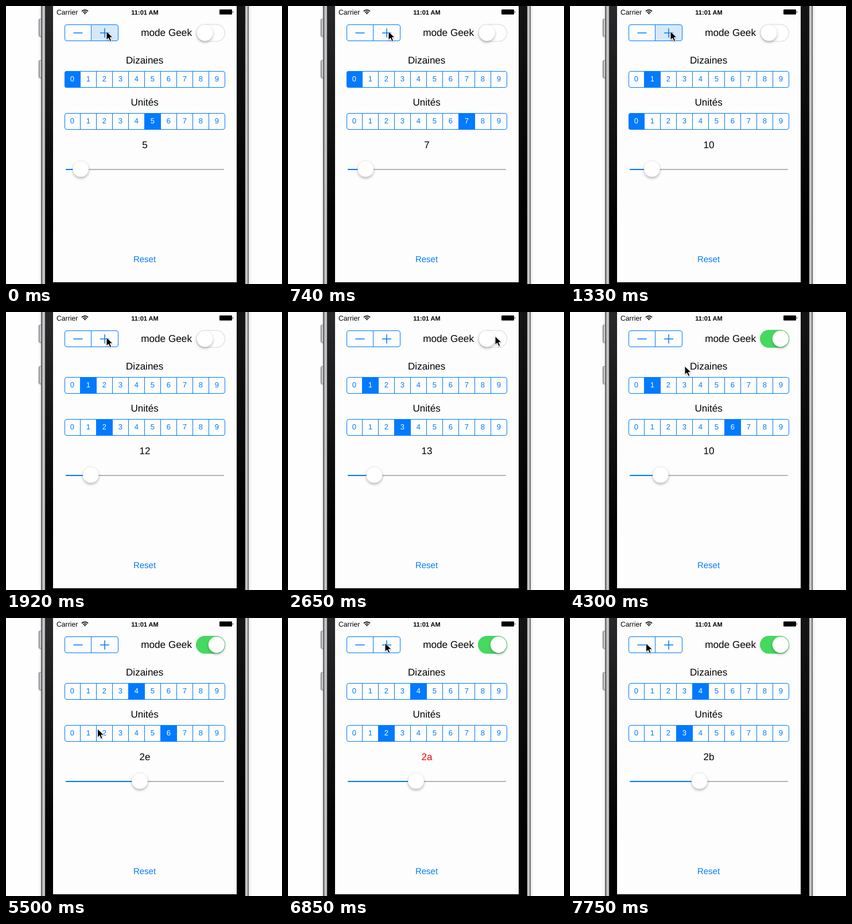
These frames come from a looping animation (481 by 483 pixels, 8000 ms). An HTML page:

```html
<!DOCTYPE html>
<html lang="fr">
<head>
<meta charset="utf-8">
<title>Compteur</title>
<style>
html, body { margin: 0; width: 100%; height: 100%; overflow: hidden; background: #fefefe; }
svg { display: block; width: 481px; height: 483px; }
text { font-family: "Liberation Sans", Arial, sans-serif; font-size: 17px; text-rendering: geometricPrecision; }
.mid { text-anchor: middle; }
.digit { font-size: 13px; text-anchor: middle; fill: #007aff; }
.line { fill: none; stroke: #007aff; }
</style>
</head>
<body>
<svg viewBox="0 0 481 483">
  <defs>
    <linearGradient id="edgeL">
      <stop offset="0" stop-color="#555557"/><stop offset=".2" stop-color="#77777a"/>
      <stop offset=".35" stop-color="#bdbdbf"/><stop offset=".8" stop-color="#cfcfd1"/>
      <stop offset="1" stop-color="#4a4a4c"/>
    </linearGradient>
    <linearGradient id="edgeR" href="#edgeL" x1="1" x2="0"/>
    <linearGradient id="key">
      <stop offset="0" stop-color="#8a8a8d"/><stop offset=".5" stop-color="#dededf"/><stop offset="1" stop-color="#a5a5a8"/>
    </linearGradient>
    <linearGradient id="sheen" x2="0" y2="1">
      <stop offset="0" stop-color="#29292b"/><stop offset=".8" stop-color="#000"/>
    </linearGradient>
    <filter id="halo" x="-10%" width="120%"><feGaussianBlur stdDeviation="3"/></filter>
    <filter id="drop" x="-50%" y="-50%" width="200%" height="200%">
      <feDropShadow dx="0" dy="2.5" stdDeviation="2" flood-opacity=".28"/>
    </filter>
    <filter id="soft" x="-50%" y="-50%" width="200%" height="200%">
      <feDropShadow dx="0" dy="1" stdDeviation="1" flood-opacity=".35"/>
    </filter>
    <clipPath id="bar"><rect x="102" width="280" height="29" rx="4"/></clipPath>
  </defs>

  <rect x="62" y="-20" width="361" height="520" fill="#000" opacity=".2" filter="url(#halo)"/>
  <g fill="url(#key)" stroke="#808083" stroke-width=".8" filter="url(#soft)">
    <rect x="57.4" y="22.4" width="6" height="30" rx="2"/>
    <rect x="57.4" y="94.4" width="6" height="30" rx="2"/>
  </g>
  <rect x="61.5" width="361.5" height="483"/>
  <rect x="68" width="14" height="483" fill="url(#sheen)"/>
  <rect x="402" width="14" height="483" fill="url(#sheen)" opacity=".5"/>
  <rect x="61.5" width="7" height="483" fill="url(#edgeL)"/>
  <rect x="416.5" width="6.5" height="483" fill="url(#edgeR)"/>
  <rect x="82" width="320" height="480" fill="#fdfdfe"/>

  <text x="88" y="14.5" style="font-size:12.2px">Carrier</text>
  <g fill="none" stroke="#000" stroke-width="1.7">
    <path d="M132 9.2a7.6 7.6 0 0 1 11 0M134.2 11.4a4.6 4.6 0 0 1 6.6 0"/>
    <path d="M135.8 12.7a2.4 2.4 0 0 1 3.4 0L137.5 14.6z" fill="#000" stroke="none"/>
  </g>
  <text class="mid" x="242" y="14.5" style="font-size:11px;font-weight:bold">11:01 AM</text>
  <rect x="372" y="6" width="22" height="8.7" rx="1.2"/>
  <path d="M395 8.5q2 1.9 0 3.8z"/>

  <rect id="plus" x="149" y="32.5" width="46" height="28" rx="3.5" fill="#d6e9fc"/>
  <rect class="line" x="102.5" y="32.5" width="93" height="28" rx="3.5"/>
  <path class="line" d="M148.5 32.5v28"/>
  <path class="line" stroke-width="1.5" d="M117.5 46.7h16M164 46.7h16M172 38.7v16"/>

  <text x="324" y="52" text-anchor="end" style="font-size:17.2px">mode Geek</text>
  <rect x="332" y="32" width="49.5" height="29.5" rx="14.75" fill="#fff" stroke="#e3e3e3" stroke-width="1.5"/>
  <rect id="on" x="331" y="31" width="51" height="31" rx="15.5" fill="#45d960"/>
  <circle id="knob" cy="46.5" r="14.2" fill="#fff" stroke="#000" stroke-opacity=".08" stroke-width=".5" filter="url(#drop)"/>

  <text class="mid" x="241.7" y="100">Dizaines</text>
  <g id="tens" transform="translate(0 113)"></g>
  <text class="mid" x="241.7" y="173">Unités</text>
  <g id="units" transform="translate(0 186)"></g>

  <text id="label" class="mid" x="242" y="247"></text>
  <rect x="104" y="283" width="276" height="2" rx="1" fill="#b5b5b6"/>
  <rect id="fill" x="104" y="283" height="2" rx="1" fill="#007aff"/>
  <circle id="thumb" cy="283" r="14" fill="#fff" stroke="#000" stroke-opacity=".12" stroke-width=".6" filter="url(#drop)"/>
  <text class="mid" x="241.5" y="444.5" style="font-size:15px" fill="#007aff">Reset</text>

  <path id="cursor" d="M0 0V15.2L3.6 11.8L6.2 17.6L8.8 16.5L6.3 10.8H11.2Z" stroke="#fff" filter="url(#soft)"/>
</svg>
<script>
const LOOP = 8000, TICK = 150;
const $ = id => document.getElementById(id);
const clamp = x => Math.max(0, Math.min(1, x));

// Bursts of taps on "+"; hold is how long the button is lit before the first one.
const bursts = [
  { start: 150, count: 1, hold: 150 },
  { start: 600, count: 4, hold: 0 },
  { start: 1630, count: 3, hold: 300 },
  { start: 3850, count: 3, hold: 150 },
  { start: 7450, count: 1, hold: 150 }
];
const TOGGLE = 2650, PICK_TENS = 5200, PICK_UNITS = 6100;

// Places the pointer visits, with arrival times.
const stops = [
  { t: 1930, x: 175, y: 44 }, { t: 2500, x: 389, y: 43 }, { t: 2650, x: 361, y: 42 },
  { t: 2950, x: 361, y: 42 }, { t: 3550, x: 132, y: 49 }, { t: 3700, x: 169, y: 44 },
  { t: 4150, x: 169, y: 44 }, { t: 4300, x: 200, y: 94 }, { t: 4750, x: 273, y: 121 },
  { t: 5200, x: 230, y: 128 }, { t: 5500, x: 159.5, y: 192.5 }, { t: 5950, x: 168, y: 200 },
  { t: 6550, x: 131, y: 72 }, { t: 6850, x: 169, y: 43.5 }, { t: 7450, x: 169, y: 43.5 },
  { t: 7750, x: 132.5, y: 44 }
];

function pointerAt(t) {
  const next = stops.findIndex(stop => stop.t > t);
  if (next === 0) return stops[0];
  if (next < 0) return stops.at(-1);
  const a = stops[next - 1], b = stops[next];
  const p = (t - a.t) / (b.t - a.t);
  const ease = p * p * (3 - 2 * p);
  return { x: a.x + (b.x - a.x) * ease, y: a.y + (b.y - a.y) * ease };
}

function valueAt(t) {
  const taps = bursts.reduce((sum, { start, count }) =>
    sum + Math.max(0, Math.min(count, Math.floor((t - start) / TICK) + 1)), 0);
  let value = 5 + taps;
  if (t >= PICK_TENS) value += 30;
  if (t >= PICK_UNITS) value -= 4;
  return value;
}

function makeBar(group) {
  let dividers = "", digits = "";
  for (let i = 0; i < 10; i++) {
    if (i) dividers += `M${101.5 + 28 * i} .5v28`;
    digits += `<text class="digit" x="${115.3 + 28 * i}" y="18.3">${i}</text>`;
  }
  group.innerHTML =
    `<g clip-path="url(#bar)"><rect class="pick" width="28" height="29" fill="#007aff"/></g>
     <rect class="line" x="102.5" y=".5" width="279" height="28" rx="3.5"/>
     <path class="line" d="${dividers}"/>${digits}`;
  const pick = group.querySelector(".pick");
  const texts = group.querySelectorAll("text");
  return n => {
    pick.setAttribute("x", 102 + 28 * n);
    texts.forEach((text, i) => text.style.fill = i === n ? "#fff" : "");
  };
}

const setTens = makeBar($("tens"));
const setUnits = makeBar($("units"));

function draw(t) {
  // Pointer and switch move in steps of one tick.
  const step = Math.floor((t + 50) / TICK) * TICK - 50;
  const value = valueAt(t);
  const lit = bursts.some(({ start, hold }) => t >= start - hold && t < start);
  const mode = clamp((step - TOGGLE) / (2 * TICK));
  const { x, y } = pointerAt(step);
  const pos = 117.7 + 2.51 * value;

  setTens(Math.floor(value / 10));
  setUnits(value % 10);
  $("label").textContent = value.toString(mode === 1 ? 16 : 10);
  $("label").setAttribute("fill", value === 42 ? "#f00010" : "#000");
  $("fill").setAttribute("width", pos - 104);
  $("thumb").setAttribute("cx", pos);
  $("plus").setAttribute("opacity", lit ? 1 : 0);
  $("on").setAttribute("opacity", mode);
  $("knob").setAttribute("cx", 346.5 + 20.5 * mode);
  $("cursor").setAttribute("transform", `translate(${x} ${y})`);
}

const start = performance.now();
function tick() {
  draw((performance.now() - start) % LOOP);
  requestAnimationFrame(tick);
}
tick();
</script>
</body>
</html>
```
